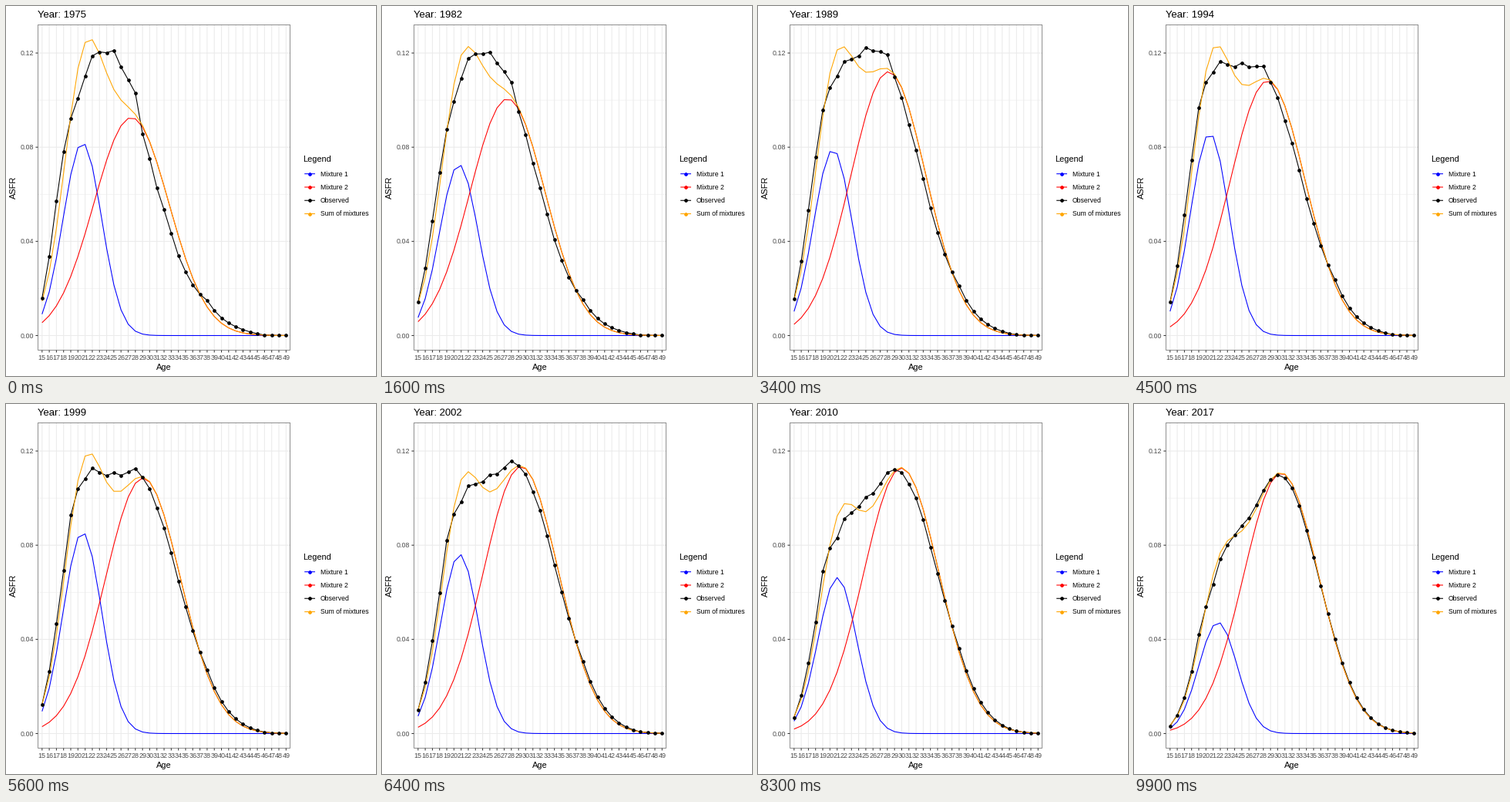
These frames come from a looping animation (480 px wide and 480 px high, 10 s). A matplotlib script:

```python
import matplotlib.pyplot as plt
import numpy as np
from matplotlib.animation import FuncAnimation
from matplotlib.patches import Rectangle

FRAMES, INTERVAL = 100, 100
FIRST, LAST = 1975, 2017

AGES = np.arange(15, 50)
LEFT, TOP, RIGHT, BOTTOM = 41.2, 24.2, 368.9, 446.7
ZERO, SCALE = 427.5, 3.054          # pixel row of 0, pixels per birth per 1000
UNIT = (RIGHT - LEFT) / (len(AGES) + 0.2)
X = LEFT + UNIT * (AGES - AGES[0] + 0.6)

GRID, INK, GREY = "#EBEBEB", "#333333", "#4D4D4D"
SERIES = {"Mixture 1": "blue", "Mixture 2": "red",
          "Observed": "black", "Sum of mixtures": "orange"}

# Both mixtures are bells of fixed width; height and mean drift over the years.
WIDTH1, WIDTH2 = 3.79, 7.4
TURNS = [1975, 1981.8, 1989.4, 1998.8, 2005.5, 2010.2, 2017]
MEAN1 = [20.62, 20.69, 20.42, 20.63, 20.95, 21.03, 21.68]
MEAN2 = [27.45, 27.47, 28.15, 29.07, 29.61, 29.95, 30.47]
MISFIT = [1.4, 0.95, 1.05, 0.9, 0.85, 0.85, 0.35]
HEIGHT1 = {1975: 82, 1978: 73.7, 1980: 75.5, 1981.8: 72.7, 1985: 69,
           1988: 71.5, 1989.4: 79, 1991: 86.2, 1998.8: 85.6, 2002: 76.4,
           2004: 73.6, 2005.5: 76.2, 2007: 79.5, 2010.2: 66.3, 2017: 47.3}
HEIGHT2 = {1975: 92.6, 1981.8: 100.6, 1986: 102.4, 1990: 113.7, 1996: 105.7,
           1998.8: 108.6, 2005.5: 118.3, 2007: 120.1, 2010.2: 112.8,
           2016: 114.3, 2017: 110.7}

# The data waves around the fitted sum; the wave slowly changes its shape.
KNOTS = [15, 17, 18, 19, 20, 21, 23, 25, 28, 29, 31, 34, 38, 42, 46]
EARLY = [1, 8.2, 6.5, -0.9, -9, -10.3, 0.5, 11.8, 6.5, -2.5, -7.8, -6, 2, 1.3, 0]
LATE = [-0.7, 3, 4.5, 9.5, 0, -11, -5, 6.5, 3.5, 1, -5, -5, 2, 1.2, 0]


def bell(height, mean, width):
    return height * np.exp(-(((AGES - mean) / width) ** 2))


def curves(year):
    """Rates of all series at a fractional year."""
    def turn(values):
        return np.interp(year, TURNS, values)

    def track(keys):
        return np.interp(year, list(keys), list(keys.values()))

    young = bell(track(HEIGHT1), turn(MEAN1), WIDTH1)
    old = bell(track(HEIGHT2), turn(MEAN2), WIDTH2)
    t = (year - FIRST) / (LAST - FIRST)
    wave = ((1 - t) * np.interp(AGES, KNOTS, EARLY)
            + t * np.interp(AGES, KNOTS, LATE))
    total = young + old
    return {"Mixture 1": young, "Mixture 2": old,
            "Observed": total + turn(MISFIT) * wave, "Sum of mixtures": total}


def row(rate):
    return ZERO - SCALE * rate


plt.rcParams["font.family"] = "Liberation Sans"
fig = plt.figure(figsize=(480 / 72, 480 / 72), dpi=72, facecolor="white")
ax = fig.add_axes([0, 0, 1, 1])
ax.set(xlim=(0, 480), ylim=(480, 0))
ax.axis("off")


def line(xs, ys, color, width=1.07, **kw):
    return ax.plot(xs, ys, color=color, lw=width, snap=False,
                   solid_capstyle="butt", solid_joinstyle="round", **kw)[0]


def dots(xs, ys, color, **kw):
    return ax.plot(xs, ys, "o", color=color, ms=3.9, mew=0.7, snap=False,
                   **kw)[0]


def label(x, y, text, size, color="black", **kw):
    return ax.text(x, y, text, fontsize=size, color=color, va="baseline", **kw)


# Grid, ticks and axis labels
for rate in (20, 60, 100):
    line([LEFT, RIGHT], [row(rate)] * 2, GRID, 0.53, zorder=1)
for rate in (0, 40, 80, 120):
    y = row(rate)
    line([LEFT, RIGHT], [y, y], GRID, zorder=1)
    line([LEFT - 2.75, LEFT], [y, y], INK)
    label(36.3, y + 3.1, f"{rate / 1000:.2f}", 8.9, GREY, ha="right")
for age, x in zip(AGES, X):
    line([x, x], [TOP, BOTTOM], GRID, zorder=1)
    line([x, x], [BOTTOM, BOTTOM + 2.75], INK)
    label(x, 458.7, str(age), 9, GREY, ha="center")

label((LEFT + RIGHT) / 2, 471.5, "Age", 11, ha="center")
label(13.4, (TOP + BOTTOM) / 2, "ASFR", 11, ha="center", rotation=90,
      rotation_mode="anchor")
title = label(41.2, 15.2, "", 13.1)

# Legend
label(384.7, 201.6, "Legend", 11)
for n, (name, color) in enumerate(SERIES.items()):
    y = 217.7 + 17.28 * n
    line([387.2, 401], [y, y], color)
    dots([394.1], [y], color)
    label(407.6, y + 2.9, name, 8.65)

# Data
lines = {name: line([], [], color, zorder=3) for name, color in SERIES.items()}
points = dots([], [], SERIES["Observed"], zorder=4)
ax.add_patch(Rectangle((LEFT + 0.27, TOP + 0.27), RIGHT - LEFT - 0.54,
                       BOTTOM - TOP - 0.54, fill=False, ec=INK, lw=0.54,
                       snap=False, zorder=5))


def update(i):
    year = FIRST + (LAST - FIRST) * i / (FRAMES - 1)
    title.set_text(f"Year: {int(year + 0.5)}")
    data = curves(year)
    for name, rates in data.items():
        lines[name].set_data(X, row(rates))
    points.set_data(X, row(data["Observed"]))
    return [title, points, *lines.values()]


anim = FuncAnimation(fig, update, frames=FRAMES, interval=INTERVAL,
                     repeat=True, repeat_delay=0, blit=False)
plt.show()
```
